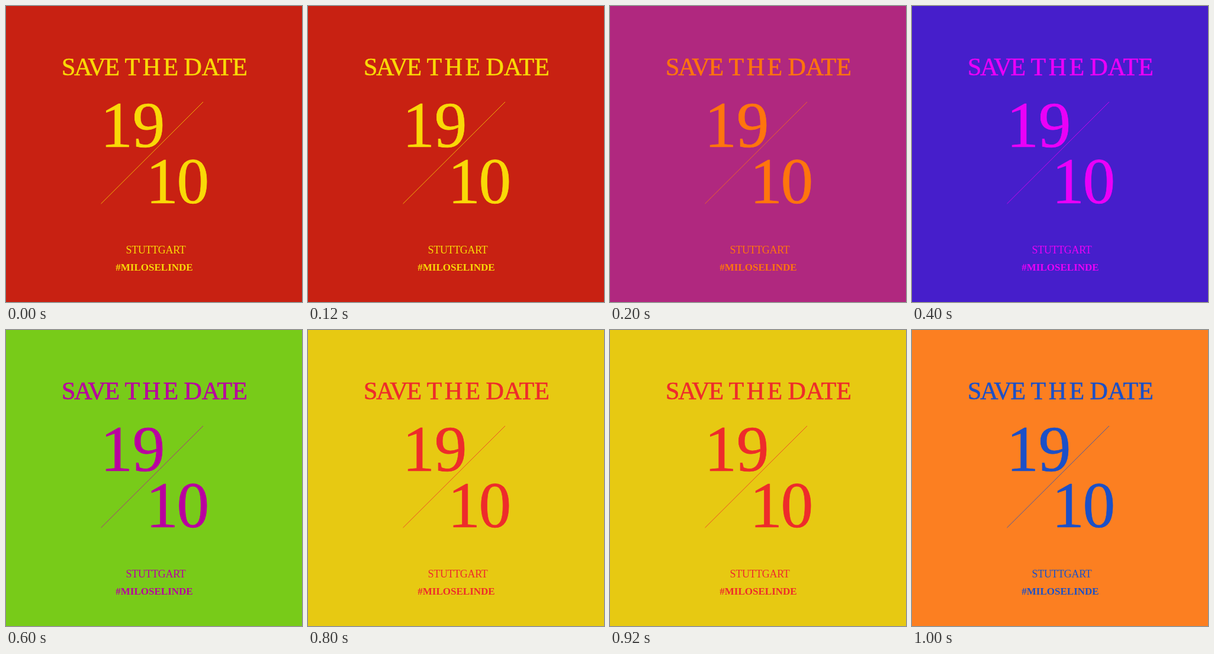
An HTML page that plays this animation: 500 px wide and 500 px high, repeating every 1200 ms.

```html
<!DOCTYPE html>
<html lang="en">
<head>
<meta charset="utf-8">
<title>Save the date</title>
<style>
  html, body { margin: 0; width: 100%; height: 100%; overflow: hidden; }
  svg { display: block; width: 100vw; height: 100vh; background: #c82112; color: #f9d907; }
  text { font-family: "Liberation Serif", "Times New Roman", serif; fill: currentColor; }
  line { stroke: currentColor; stroke-width: .8; }
  .title { font-size: 42px; stroke: currentColor; stroke-width: .6; }
  .date { font-size: 109.5px; stroke: currentColor; stroke-width: .7; }
  .place { font-size: 18px; text-anchor: middle; letter-spacing: -.35px; }
  .tag { font-size: 17px; font-weight: bold; text-anchor: middle; }
</style>
</head>
<body>
<svg id="card" viewBox="0 0 500 500">
  <g class="title">
    <text x="94" y="116.8" letter-spacing="-2">SAVE</text>
    <text x="200.5" y="116.8" letter-spacing="4.5">THE</text>
    <text x="300.5" y="116.8">DATE</text>
  </g>
  <g class="date">
    <text x="159.5" y="238" letter-spacing="-.5">19</text>
    <text x="236.3" y="333" letter-spacing="-2.5">10</text>
  </g>
  <line x1="160.5" y1="334" x2="333" y2="162"/>
  <text class="place" x="253" y="418.3">STUTTGART</text>
  <text class="tag" x="250.5" y="447.3">#MILOSELINDE</text>
</svg>
<script>
  const STEP = 200;
  // background, ink
  const palettes = [
    ["#c82112", "#f9d907"],
    ["#b0287f", "#ff750d"],
    ["#461ecb", "#ea00f8"],
    ["#78cb19", "#b900a0"],
    ["#e7c912", "#ee2b2b"],
    ["#fc7f21", "#1b50c8"]
  ];
  const frames = [...palettes, palettes[0]].map(([backgroundColor, color], i) => ({
    backgroundColor, color, offset: i / palettes.length, easing: "step-end"
  }));
  document.getElementById("card").animate(frames, {
    duration: STEP * palettes.length,
    iterations: Infinity
  });
</script>
</body>
</html>
```
